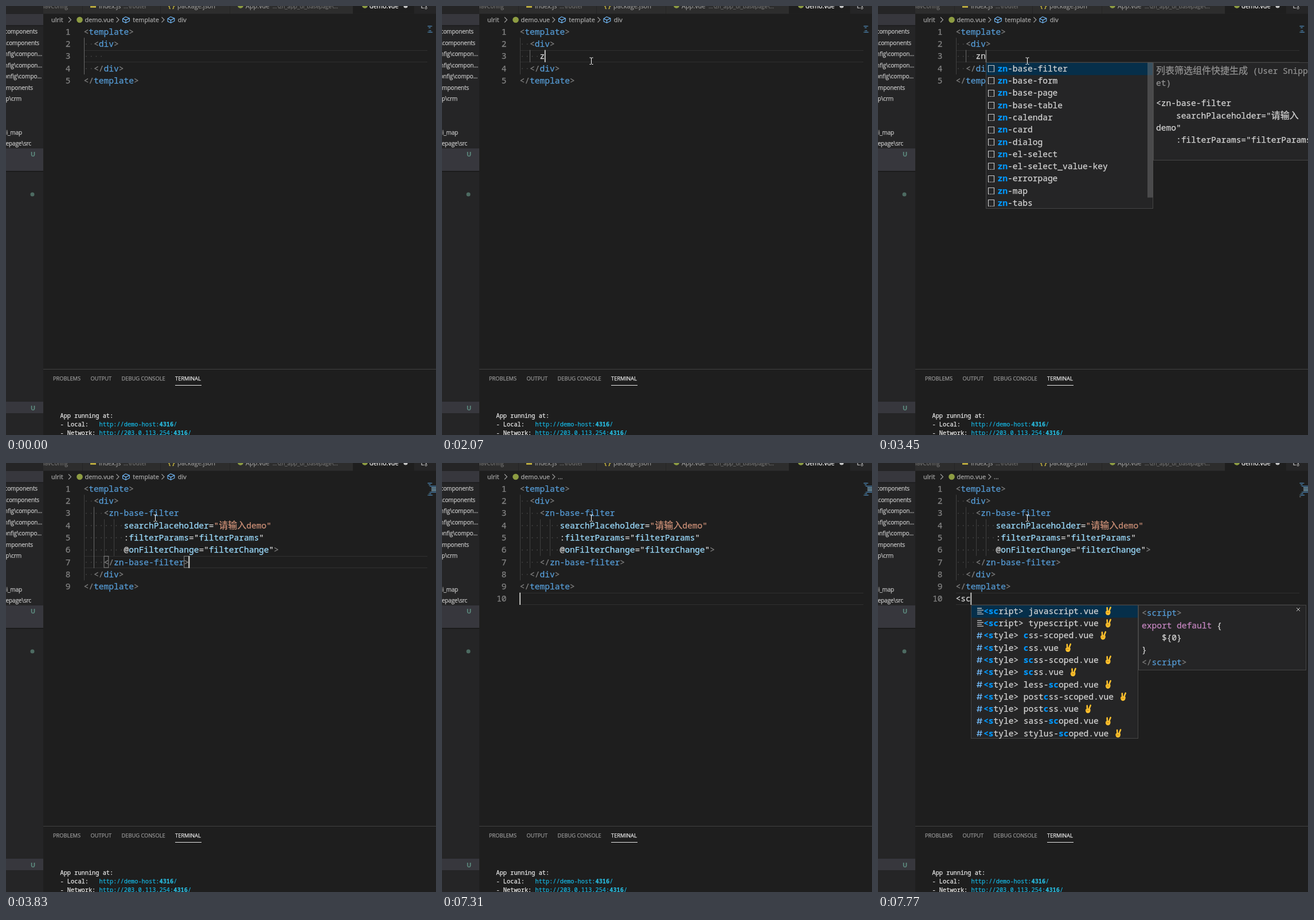
An HTML page that plays this animation: 750x747 px, repeating every 8 s.

```html
<!DOCTYPE html>
<html lang="en">
<head>
<meta charset="utf-8">
<title>Editor snippets</title>
<style>
  html, body { margin: 0; width: 100%; height: 100%; overflow: hidden; background: #1e1e1e; }
  svg { display: block; width: 100vw; height: 100vh; }
  text { white-space: pre; stroke-width: .25px; }
  .mono { font-family: "Noto Sans Mono", "Noto Sans CJK SC", "DejaVu Sans Mono", monospace; font-size: 14.55px; }
  .ui { font-family: "Open Sans", "Noto Sans", sans-serif; font-size: 10.9px; }
</style>
</head>
<body>
<svg id="stage" viewBox="0 0 750 747"></svg>
<script>
const LOOP = 8000, CW = 8.73, LH = 21.3, LEFT = 135.6, TOP = 34, BASE = 15.7;
const GREY = '#808080', BLUE = '#569cd6', ATTR = '#9cdcfe', TEXT = '#d4d4d4',
      STRING = '#ce9178', PINK = '#c586c0', MATCH = '#0097fb';
const stage = document.getElementById('stage');
const timed = [];

function el(parent, name, attrs = {}) {
  const node = document.createElementNS('http://www.w3.org/2000/svg', name);
  for (const key in attrs) node.setAttribute(key, attrs[key]);
  return parent.appendChild(node);
}
const rect = (g, x, y, width, height, fill, more) => el(g, 'rect', { x, y, width, height, fill, ...more });
const dot = (g, cx, cy, r, fill) => el(g, 'circle', { cx, cy, r, fill });
const line = (g, d, stroke, width = 1, at = [0, 0]) => el(g, 'path', {
  d, stroke, fill: 'none', 'stroke-width': width, transform: `translate(${at})`
});
function ui(g, x, y, str, fill, more) {
  el(g, 'text', { class: 'ui', x, y: Math.round(y), fill, stroke: fill, ...more }).textContent = str;
}
// A run of [text, colour, weight] parts; wide glyphs get their own size.
function mono(g, x, y, parts, more) {
  const text = el(g, 'text', { class: 'mono', x, y: Math.round(y), ...more });
  for (const [str, fill, weight = 400] of parts)
    for (const bit of str.split(/([\u4e00-\u9fff]+)/)) {
      if (!bit) continue;
      const span = el(text, 'tspan', { fill, stroke: fill, 'font-weight': weight });
      if (/[\u4e00-\u9fff]/.test(bit)) span.style.fontSize = '16px';
      span.textContent = bit;
    }
}
function during(from, to = LOOP, parent = stage) {
  const g = el(parent, 'g');
  timed.push([g, from, to]);
  return g;
}

/* ---------- code ---------- */
const open = name => [['<', GREY], [name, BLUE], ['>', GREY]];
const close = name => [['</', GREY], [name, BLUE], ['>', GREY]];
const bound = (sign, name, value, end) =>
  [[sign, TEXT], [name, ATTR], ['="', TEXT], [value, ATTR], ['"', TEXT], [end, GREY]];

const shortCode = [
  [0, open('template')], [2, open('div')], [4, []], [2, close('div')], [0, close('template')]
];
const longCode = [
  [0, open('template')],
  [2, open('div')],
  [4, [['<', GREY], ['zn-base-filter', BLUE]]],
  [8, [['searchPlaceholder', ATTR], ['=', TEXT], ['"请输入demo"', STRING]]],
  [8, bound(':', 'filterParams', 'filterParams', '')],
  [8, bound('@', 'onFilterChange', 'filterChange', '>')],
  [4, close('zn-base-filter')],
  [2, close('div')],
  [0, close('template')]
];
const colX = col => LEFT + col * CW;
const rowY = row => TOP + row * LH;

function lineNumber(g, row) {
  mono(g, 112.6, rowY(row) + BASE, [[String(row + 1), '#858585']], { 'text-anchor': 'end' });
}
function codeLine(g, row, [indent, parts]) {
  lineNumber(g, row);
  for (let i = 0; i < indent; i++) dot(g, colX(i + .5), rowY(row) + 11, .9, '#474747');
  mono(g, colX(indent), rowY(row) + BASE, parts);
  let at = 735 + indent * .86;
  for (const [str, fill] of parts) {
    rect(g, at, rowY(0) + .5 + row * 2.6, str.length * .86, 1.4, fill === GREY ? '#4a6f78' : fill, { opacity: .8 });
    at += str.length * .86;
  }
}
function guide(g, col, from, to, active) {
  rect(g, Math.round(colX(col)), rowY(from), 1, (to - from + 1) * LH, active ? '#6a6a6a' : '#404040');
}

/* ---------- window ---------- */
function drawWindow() {
  rect(stage, 0, 0, 750, 747, '#1e1e1e');

  rect(stage, 65, 0, 685, 13.5, '#252526');
  for (const [x, w] of [[65, 68], [134, 135], [270, 120], [391, 214]]) rect(stage, x, 0, w, 13.5, '#2d2d2d');
  rect(stage, 605, 0, 107, 13.5, '#1e1e1e');
  const dim = '#6f6f6f', tab = '#969696';
  ui(stage, 65, 4, 'lavConfig', dim, { style: 'font-size:10px' });
  rect(stage, 147, -6, 10, 9, '#b7a73e');
  ui(stage, 162, 4, 'index.js', tab);
  ui(stage, 205, 4, '...\\router', dim, { style: 'font-size:10px' });
  ui(stage, 283, 4, '{ }', '#b7a73e', { 'font-weight': 700 });
  ui(stage, 299, 4, 'package.json', tab);
  dot(stage, 409, -1, 5, '#8d9c42');
  ui(stage, 418, 4, 'App.vue', tab);
  ui(stage, 465, 4, '...\\zn_app_ui_basepage\\...', dim, { style: 'font-size:9.6px' });
  dot(stage, 626, -1, 5, '#8d9c42');
  ui(stage, 634, 4, 'demo.vue', '#ffffff');
  dot(stage, 697, 0, 3.6, '#c5c5c5');
  line(stage, 'M725 0V3.5H729M733 0V2', '#c5c5c5', 1.2);
  el(stage, 'circle', { cx: 732.5, cy: 3.5, r: 1.7, fill: 'none', stroke: '#c5c5c5' });

  rect(stage, 0, 0, 65, 747, '#252526');
  rect(stage, 0, 14, 65, 19.5, '#37373d');
  rect(stage, 0, 33.5, 65, 1.5, '#1d1d1e');
  rect(stage, 0, 248, 65, 39, '#37373d');
  rect(stage, 0, 287, 65, 2, '#1b1b1c');
  rect(stage, 0, 689, 65, 20, '#37373d');
  const files = [
    [0, 55, 'components'], [1, 58, '\\components'], [2, 63, 'onfig\\compon...'], [3, 63, 'onfig\\compon...'],
    [4, 62, 'config\\compo...'], [5, 47, 'components'], [6, 27, 'map\\crm'], [9, 28, 'ui_map'], [10, 44, 'basepage\\src']
  ];
  for (const [row, right, name] of files)
    ui(stage, right, 48 + row * 19.5, name, '#c4c4c4',
      { 'text-anchor': 'end', style: 'font-size:10.1px;letter-spacing:-.15px' });
  for (const y of [262, 703.5]) ui(stage, 43, y, 'U', '#5f8f83', { 'font-weight': 600 });
  dot(stage, 46, 328, 3.5, '#4d6b62');

  rect(stage, 65, 632, 685, 1, '#414141');
  [[82, 'PROBLEMS'], [147.5, 'OUTPUT'], [201.5, 'DEBUG CONSOLE'], [295, 'TERMINAL']].forEach(([x, name], i) =>
    ui(stage, x, 652.3, name, i === 3 ? '#e7e7e7' : '#969696', { style: 'font-size:9.3px' }));
  rect(stage, 295, 660, 46, 1, '#e7e7e7');

  const small = { style: 'font-size:10.3px' }, pale = '#e8e8e8', cyan = '#16b1dc';
  const address = (label, host) =>
    [[label, pale], [`http://${host}:`, cyan], ['4316', '#29b8db', 700], ['/', cyan]];
  mono(stage, 94.5, 717, [['App running at:', pale]], small);
  mono(stage, 94.5, 732, address('- Local:   ', 'demo-host'), small);
  mono(stage, 94.5, 747, address('- Network: ', '203.0.113.254'), small);
}

/* ---------- breadcrumb ---------- */
const chevron = (g, x) => line(g, 'M-2.5-4.5L2 0-2.5 4.5', '#a0a0a0', 1.1, [x, 24]);
function crumb(g, x, name) {
  line(g, 'M-1-5.2L5.8-2.6V2.2L-.5 5.4-6 2.8V-2ZM-6-2L-.5.6 5.8-2.6M-.5.6V5.4', '#75beff', 1.1, [x, 24]);
  ui(g, x + 11.8, 28.2, name, '#a9a9a9');
}
function drawCrumbs() {
  ui(stage, 79, 28.2, 'ulrit', '#a9a9a9');
  chevron(stage, 111.5);
  dot(stage, 128.5, 24, 5.3, '#8d9c42');
  ui(stage, 137.5, 28.2, 'demo.vue', '#a9a9a9');
  chevron(stage, 195);
  crumb(during(0, 6300), 209.5, 'template');
  const div = during(0, 5060);
  chevron(div, 274);
  crumb(div, 288, 'div');
  const tag = during(4140, 4980);
  chevron(tag, 324.5);
  crumb(tag, 338.5, 'zn-base-filter');
  ui(during(6300), 202, 28.2, '...', '#a9a9a9');
}

/* ---------- editor ---------- */
function drawCode() {
  const before = during(0, 3830);
  shortCode.forEach((item, row) => codeLine(before, row, item));
  guide(during(0, 2070), 0, 1, 3, true);
  const typed = during(2070, 3830);
  guide(typed, 0, 1, 3);
  guide(typed, 2, 2, 2, true);
  mono(typed, colX(4), rowY(2) + BASE, [['z', TEXT]]);
  mono(during(2140, 3830), colX(5), rowY(2) + BASE, [['n', TEXT]]);

  const after = during(3830);
  longCode.forEach((item, row) => codeLine(after, row, item));
  for (const [col, from, to] of [[0, 1, 7], [2, 2, 6], [4, 3, 5], [6, 3, 5]]) guide(after, col, from, to);
  const pair = during(3830, 4830);
  guide(pair, 2, 2, 6, true);
  for (const col of [4, 20])
    rect(pair, colX(col) + .5, rowY(6) + .5, CW - 1, LH - 1.5, 'none', { stroke: '#888' });
  guide(during(4830, 4910), 0, 1, 7, true);

  lineNumber(during(5920), 9);
  [[7390, '<'], [7620, 's'], [7770, 'c']].forEach(([from, key], col) => {
    const g = during(from);
    mono(g, colX(col), rowY(9) + BASE, [[key, TEXT]]);
    rect(g, 735 + col * .86, 58, .86, 1.4, '#777');
  });
}

/* ---------- suggestions ---------- */
function panel(g, x, y, w, h) {
  rect(g, x + .5, y + .5, w - 1, h - 1, '#252526', { stroke: '#454545' });
}
function list(g, x, y, rows) {
  panel(g, x, y, 292, Math.floor(rows * LH - .5));
  rect(g, x + 1, y + 1, 290, LH, '#062f4a');
}
function hand(g, x, y) {
  const at = { transform: `translate(${x},${y})`, 'stroke-linecap': 'round' };
  el(g, 'path', { d: 'M5 9L4.6 2.6M7.8 9L10.6 2', stroke: '#fbc02d', 'stroke-width': 2.6, ...at });
  el(g, 'path', { d: 'M2 9Q6 7 10.4 8.5V11.5Q9.6 15.6 6.2 15.6 2.8 15.6 2 12Z', fill: '#fbc02d', ...at });
  el(g, 'path', { d: 'M3.6 11H7.8', stroke: '#b9770e', 'stroke-width': .8, ...at });
}

function drawTags() {
  const names = ['base-filter', 'base-form', 'base-page', 'base-table', 'calendar', 'card', 'dialog',
    'el-select', 'el-select_value-key', 'errorpage', 'map', 'tabs'];
  const g = during(2140, 3830);
  list(g, 188, 98, names.length);
  names.forEach((name, i) => {
    const y = Math.round(98 + i * LH);
    line(g, 'M.5 11V.5H10.5V11M0 11.5H2M3 11.5H5M6 11.5H8M9 11.5H11', '#c5c5c5', 1.2, [192, y + 5]);
    mono(g, 208.6, 98 + i * LH + BASE, [['zn', MATCH, 700], ['-' + name, TEXT]]);
  });
  rect(g, 470, 98.5, 9.5, 235, '#797979', { opacity: .45 });

  const help = during(2220, 3830);
  panel(help, 480, 98, 280, 171);
  const rows = [
    [118, 0, '列表筛选组件快捷生成 (User Snipp', '#929292'], [139.3, 0, 'et)', '#929292'],
    [174.3, 0, '<zn-base-filter'], [195.6, 4, 'searchPlaceholder="请输入'],
    [216.9, 0, 'demo"'], [238.2, 4, ':filterParams="filterParams']
  ];
  for (const [y, indent, str, fill = TEXT] of rows) mono(help, 485 + indent * CW, y, [[str, fill]]);
}

function blockLabel(name, typed) {
  const tag = /script$/.test(name) ? '<script>' : '<style>';
  const head = tag[1] + tag[2] === 'sc' ? typed : typed.slice(0, 2);
  const parts = [[head, MATCH, 700], [tag.slice(head.length) + ' ', TEXT]];
  const key = /^(post)?css/.test(name) ? 'c' : 'sc';
  const at = typed.length > head.length ? name.indexOf(key) : -1;
  if (at < 0) parts.push([name, TEXT]);
  else parts.push([name.slice(0, at), TEXT], [key, MATCH, 700], [name.slice(at + key.length), TEXT]);
  return [...parts, ['.vue', TEXT]];
}
function drawBlocks(typed, from, to) {
  const all = ['javascript', 'typescript', 'css-scoped', 'css', 'scss-scoped', 'scss', 'less-scoped', 'less',
    'postcss-scoped', 'postcss', 'sass-scoped', 'sass', 'stylus-scoped'];
  const names = all.filter(name => typed.length < 3 || name.includes('c')).slice(0, 12);
  const x = Math.round(colX(typed.length) + .2), y0 = 247;
  const g = during(from, to);
  list(g, x, y0, names.length);
  names.forEach((name, i) => {
    const y = y0 + i * LH, parts = blockLabel(name, typed);
    if (i < 2) line(g, 'M0 0H8M0 3.3H11M0 6.6H8M0 9.9H11', '#c5c5c5', 1.3, [x + 11, y + 6]);
    else line(g, 'M3.8 0L2 10.5M8 0L6.2 10.5M.8 3.3H10M0 7.2H9.2', '#75beff', 1.3, [x + 10, y + 5.5]);
    mono(g, x + 22, y + BASE, parts);
    const length = parts.reduce((sum, part) => sum + part[0].length, 1);
    hand(g, x + 23.5 + length * CW, y + 2.5);
  });
  if (typed.length < 3) rect(g, x + 282, y0 + .5, 9.5, 235, '#797979', { opacity: .45 });

  const hx = x + 292;
  panel(g, hx, y0, 293, 114);
  line(g, 'M-3-3L3 3M3-3L-3 3', '#c5c5c5', 1, [hx + 279, 255]);
  const rows = [open('script'), [['export default ', PINK], ['{', TEXT]], [['    ${0}', TEXT]], [['}', TEXT]], close('script')];
  rows.forEach((parts, i) => mono(g, hx + 6, 266.3 + i * LH, parts));
}

/* ---------- build ---------- */
drawWindow();
drawCrumbs();
const current = el(stage, 'g');
rect(current, 136, 0, 599, 1, '#303030');
rect(current, 136, 20, 599, 1, '#303030');
drawCode();
const caret = rect(stage, 0, 0, 1.8, LH, '#d0d0ce');
drawTags();
drawBlocks('<', 7390, 7620);
drawBlocks('<s', 7620, 7770);
drawBlocks('<sc', 7770, LOOP);
const mouse = el(stage, 'g');
line(mouse, 'M-3-5.5H-1L0-4.5 1-5.5H3M0-4.5V5M-3 6H-1L0 5 1 6H3', '#fff');

/* ---------- motion ---------- */
const STEP = 76;
// time, column, row
const moves = [[0, 4, 2], [2070, 5, 2], [2140, 6, 2], [3830, 21, 6], [4830, 8, 7], [4910, 11, 8],
  [5920, 0, 9], [7390, 1, 9], [7620, 2, 9], [7770, 3, 9]];
// time, final opacity, steps
const fades = [[760, 1, 2], [1450, 0, 3], [2840, 0, 2], [3450, 1, 2], [4450, 0, 2], [5610, 0, 2], [6530, 0, 3], [7170, 1, 2]];
const blinks = [...fades, ...moves.slice(1).map(([t]) => [t, 1, 1])].sort((a, b) => a[0] - b[0]);
const nudges = [[760, 264, 97], [840, 266, 98.5], [990, 251, 88], [1070, 260.5, 95.5]];
const last = (table, t) => table.filter(row => row[0] <= t).pop();

function caretAlpha(t) {
  const blink = last(blinks, t);
  if (!blink) return 0;
  const [start, end, steps] = blink;
  const k = Math.min(1, (Math.floor((t - start) / STEP) + 1) / steps);
  return end ? k : 1 - k;
}
function mouseAt(t) {
  const nudge = last(nudges, t);
  if (nudge) return nudge.slice(1);
  const p = Math.min(6, Math.floor((t - 130) / STEP)) / 6;
  const rest = (1 - p) ** 2;
  return [260.5 + 305 * rest, 95.5 + 479.5 * rest];
}
function render(t) {
  for (const [g, from, to] of timed) g.style.display = t >= from && t < to ? '' : 'none';
  const [, col, row] = last(moves, t);
  current.setAttribute('transform', `translate(0,${Math.round(rowY(row))})`);
  caret.setAttribute('x', colX(col) - .4);
  caret.setAttribute('y', rowY(row));
  caret.setAttribute('opacity', caretAlpha(t));
  mouse.style.display = t < 130 ? 'none' : '';
  mouse.setAttribute('transform', `translate(${mouseAt(t)})`);
}
const start = performance.now();
function tick() {
  render((performance.now() - start) % LOOP);
  requestAnimationFrame(tick);
}
tick();
</script>
</body>
</html>
```
